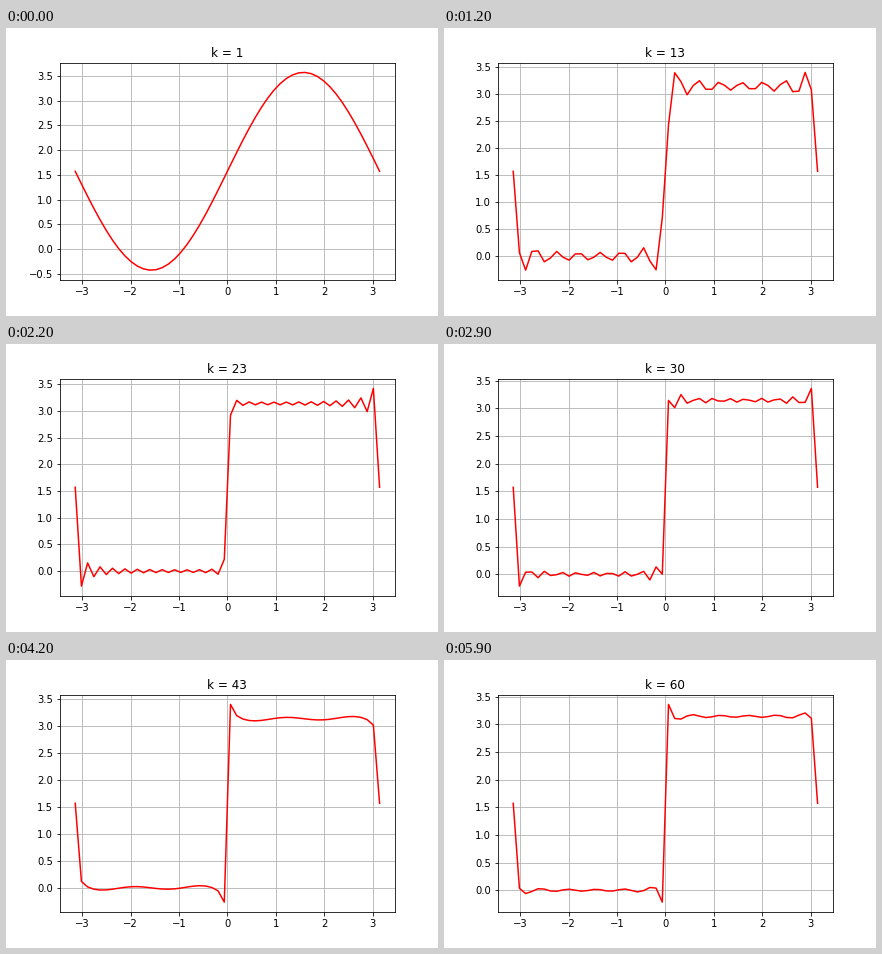
Animation, 432 px wide and 288 px high, one loop 6 s. Source, as a matplotlib script:

```python
import numpy as np
import matplotlib.pyplot as plt
from matplotlib.animation import FuncAnimation

FRAMES = 60
INTERVAL = 100  # ms

x = np.linspace(-np.pi, np.pi, 50)

fig, ax = plt.subplots(figsize=(6, 4), dpi=72)
fig.subplots_adjust(left=0.125, right=0.9, bottom=0.125, top=0.88)


def partial_sum(k):
    """Fourier series of a 0-to-pi square wave, up to harmonic k."""
    n = np.arange(1, k + 1, 2)[:, None]
    return np.pi / 2 + 2 * (np.sin(n * x) / n).sum(axis=0)


def draw(frame):
    k = frame + 1
    ax.clear()
    ax.plot(x, partial_sum(k), color="red", linewidth=1.5)
    ax.set_title(f"k = {k}")
    ax.grid(True)


anim = FuncAnimation(fig, draw, frames=FRAMES, interval=INTERVAL,
                     repeat=True, repeat_delay=0)
plt.show()
```
